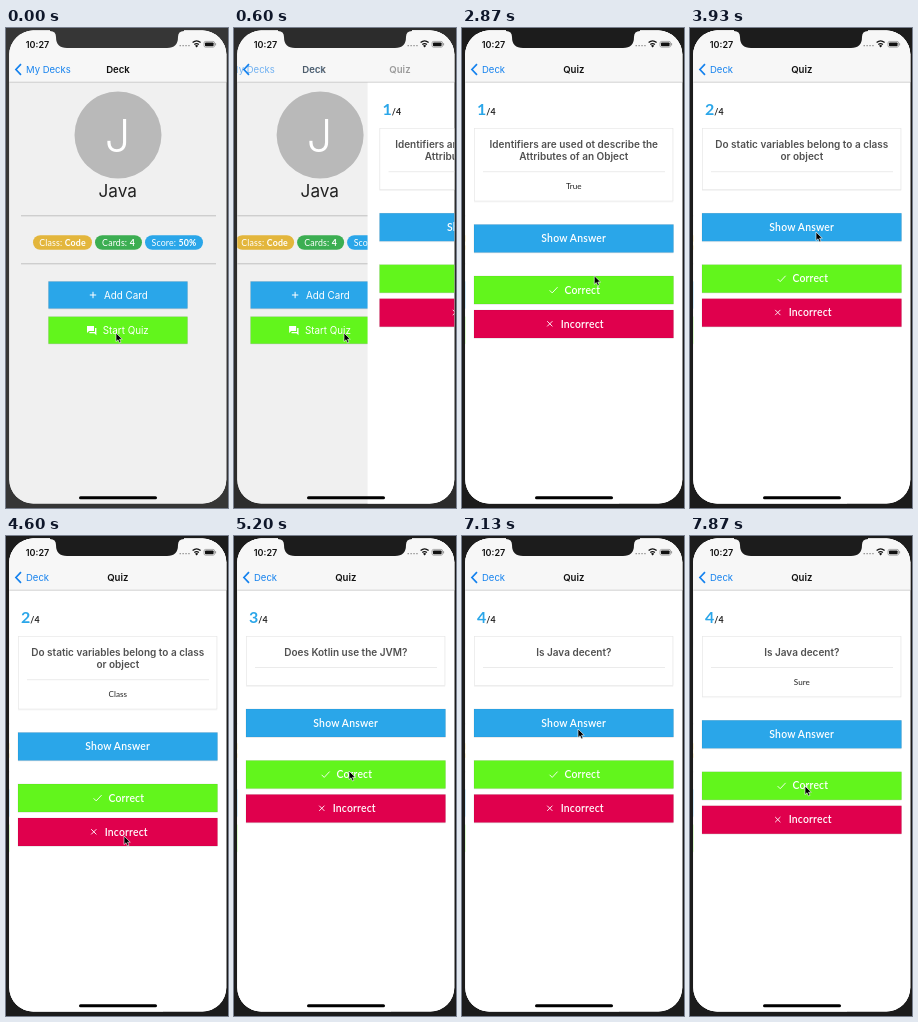
Write an HTML page that moves like this. It is 222 px wide and 480 px high and loops after 8000 ms.

```html
<!DOCTYPE html>
<html lang="en">
<head>
<meta charset="utf-8">
<title>Quiz app</title>
<style>
  html, body { margin: 0; width: 100%; height: 100%; overflow: hidden; background: #1c1c1c; }
  svg { display: block; width: 100vw; height: 100vh; }
  text { font-family: Inter, sans-serif; }
  .av { font-family: Lato, sans-serif; }
  .mid { text-anchor: middle; }
  .semi { font-weight: 600; }
  .bold { font-weight: 700; }
  .line { fill: none; stroke: #fff; }
  .keys rect { stroke: #000; stroke-opacity: .1; stroke-width: .6; }
</style>
</head>
<body>
<svg viewBox="0 0 222 480">
  <defs>
    <clipPath id="glass"><rect x="3.3" y="2.6" width="217" height="473" rx="24"/></clipPath>
    <filter id="soft" x="-5%" y="-10%" width="110%" height="125%">
      <feDropShadow dx="0" dy=".4" stdDeviation=".7" flood-opacity=".12"/>
    </filter>
  </defs>
  <rect id="bezel" width="222" height="480"/>
  <g clip-path="url(#glass)">
    <rect width="222" height="480" fill="#fff"/>

    <g id="deck">
      <rect width="222" height="480" fill="#f0f0f0"/>
      <circle cx="112" cy="107" r="43.5" fill="#b9b9b9"/>
      <text class="mid" x="111.5" y="123.5" font-size="45" font-weight="300" fill="#fff">J</text>
      <text class="mid" x="111.7" y="169" font-size="17.2" fill="#222">Java</text>
      <path d="M15 187.8H210M15 235.8H210" stroke="#b4b4b4" stroke-width=".8"/>
      <g id="pills"></g>
      <g class="keys" filter="url(#soft)">
        <rect x="42.5" y="253.5" width="139" height="27" fill="#2aa6e9"/>
        <rect x="42.5" y="288.7" width="139" height="27" fill="#62f51e"/>
      </g>
      <path class="line" d="M83.8 267H90.2M87 263.8V270.2"/>
      <path d="M81 298h7v5h-5l-2 2zM89 300h1.4v7.2l-2-2h-5v-1.2h5.6z" fill="#fff"/>
      <text x="98" y="270.5" font-size="9.8" fill="#fff">Add Card</text>
      <text x="96.8" y="305.7" font-size="9.8" fill="#fff">Start Quiz</text>
    </g>

    <g id="quiz">
      <rect width="222" height="480" fill="#fff"/>
      <text class="av bold" x="15" y="87"><tspan id="num" font-size="16" fill="#2aa6e9"></tspan><tspan font-size="8.8" fill="#222">/4</tspan></text>
      <rect id="card" x="12.3" y="100.3" width="198.6" fill="#fff" stroke="#e6e6e6" stroke-width=".6" filter="url(#soft)"/>
      <text id="q1" class="mid semi" x="111.8" y="119.6" font-size="10" fill="#505050"></text>
      <text id="q2" class="mid semi" x="111.8" y="132.2" font-size="10" fill="#505050"></text>
      <path id="rule" d="M21 131.5H203" stroke="#e2e2e2" stroke-width=".7"/>
      <text id="answer" class="av mid" x="111.8" y="149" font-size="8.1" fill="#222"></text>
      <g id="buttons">
        <g class="keys" filter="url(#soft)">
          <rect x="12" y="173" width="199.5" height="28" fill="#2aa6e9"/>
          <rect x="12" y="224.5" width="199.5" height="28" fill="#62f51e"/>
          <rect x="12" y="258.5" width="199.5" height="28" fill="#e0004d"/>
        </g>
        <g class="semi" fill="#fff" font-size="10.4" letter-spacing=".2">
          <text class="av mid" x="111.7" y="190.5">Show Answer</text>
          <text class="av" x="102.4" y="242.2">Correct</text>
          <text class="av" x="98.7" y="276.2">Incorrect</text>
        </g>
        <path class="line" d="M87.6 238.8l2.6 2.6 5.4-5.8M85.2 269.7l5.2 5.2M90.4 269.7l-5.2 5.2" stroke-width=".9"/>
      </g>
    </g>

    <rect width="222" height="54" fill="#f7f7f7"/>
    <path d="M0 54.2H222" stroke="#b2b2b2" stroke-width=".6"/>
    <path d="M15 36.2L9.9 41.5L15 46.8" fill="none" stroke="#1582ee" stroke-width="1.7"/>
    <text id="backOld" x="20" y="45" font-size="9.5" fill="#1582ee">My Decks</text>
    <text id="backNew" x="20" y="45" font-size="9.5" fill="#1582ee">Deck</text>
    <text id="titleOld" class="mid semi" x="112" y="45" font-size="9.6" fill="#111">Deck</text>
    <text id="titleNew" class="mid semi" x="111.8" y="45" font-size="9.6" fill="#111">Quiz</text>

    <text class="mid semi" x="31.5" y="19.8" font-size="9" fill="#111">10:27</text>
    <path d="M173.5 17.6H184" stroke="#999" stroke-width="1.3" stroke-dasharray="1.5 1.4"/>
    <path d="M186.6 14.6q4-3.4 8 0M188.3 16.5q2.3-1.9 4.6 0" fill="none" stroke="#111" stroke-width="1.3"/>
    <path d="M189 17.7q1.6-1.2 3.2 0l-1.6 1.7z" fill="#111"/>
    <rect x="198" y="13.4" width="10.6" height="5.8" rx="1.6" fill="none" stroke="#777" stroke-width=".6"/>
    <rect x="199" y="14.4" width="8.6" height="3.8" rx=".8" fill="#111"/>
    <path d="M209.6 15.2v2.2" stroke="#777" stroke-width=".8"/>
    <rect x="73" y="468.2" width="78" height="3" rx="1.5" fill="#000"/>
  </g>
  <path id="notch" d="M44 0H178V3q-6 0-6 6q0 11-11 11H61q-11 0-11-11q0-6-6-6z"/>
  <path id="cursor" d="M0 0V8.6L2 6.8L3.5 10L5 9.3L3.6 6.2H6.3z" fill="#000" stroke="#fff" stroke-width=".6"/>
</svg>
<script>
const LOOP = 8000;
const $ = id => document.getElementById(id);
const set = (id, attrs) => { for (const k in attrs) $(id).setAttribute(k, attrs[k]); };
const clamp = v => Math.max(0, Math.min(1, v));
const ease = v => v * v * (3 - 2 * v);
const mix = (a, b, p) => a + (b - a) * p;

const PUSH = { start: 520, end: 1040 };
const cards = [
  { at: 0, reveal: 2080, lines: ["Identifiers are used ot describe the", "Attributes of an Object"], answer: "True" },
  { at: 3260, reveal: 4140, lines: ["Do static variables belong to a class", "or object"], answer: "Class" },
  { at: 4830, reveal: 5800, lines: ["Does Kotlin use the JVM?", ""], answer: "Yes" },
  { at: 6600, reveal: 7340, lines: ["Is Java decent?", ""], answer: "Sure" }
];

// Pointer stops: time, x, y
const stops = [
  [0, 110, 305], [900, 110, 305], [1300, 93, 204], [2200, 93, 204],
  [2800, 134, 242], [3000, 128, 262], [3340, 128, 262], [3800, 126, 204],
  [4220, 126, 204], [4540, 118, 300], [4850, 118, 300], [5140, 115, 235],
  [5350, 115, 235], [5600, 116, 192], [5860, 116, 192], [6200, 115.5, 252],
  [6680, 115.5, 252], [7020, 116, 193], [7400, 116, 193], [7700, 115, 250], [LOOP, 115, 250]
];

const pills = [
  [27, 59, "#e3b63c", "Class: ", "Code"],
  [89, 47, "#3cae52", "Cards: ", "4"],
  [139, 58, "#2aa6e9", "Score: ", "50%"]
];
$("pills").innerHTML = pills.map(([x, w, fill, label, value]) =>
  `<rect x="${x}" y="207.2" width="${w}" height="14.6" rx="7.3" fill="${fill}"/>
   <text class="av mid" x="${x + w / 2}" y="217.6" font-size="8.8" letter-spacing=".15" fill="#fff">${label}<tspan class="bold">${value}</tspan></text>`
).join("");

function pointer(t) {
  const i = stops.findIndex(s => s[0] > t);
  const [t0, x0, y0] = stops[i - 1], [t1, x1, y1] = stops[i];
  const p = ease((t - t0) / (t1 - t0));
  return [mix(x0, x1, p), mix(y0, y1, p)];
}

function drawPush(t) {
  const p = 1 - (1 - clamp((t - PUSH.start) / (PUSH.end - PUSH.start))) ** 3;
  const shade = Math.round(mix(54, 28, p));
  const dark = `rgb(${shade},${shade},${shade})`;
  set("bezel", { fill: dark });
  set("notch", { fill: dark });
  set("deck", { transform: `translate(${-65 * p})` });
  set("quiz", { transform: `translate(${222 * (1 - p)})` });
  set("backOld", { opacity: 1 - p, x: 20 - 60 * p });
  set("titleOld", { opacity: 1 - p, x: 112 - 80 * p });
  set("backNew", { opacity: p, x: 100 - 80 * p });
  set("titleNew", { opacity: p, x: 111.8 + 90 * (1 - p) });
}

function drawCard(t) {
  let n = cards.length - 1;
  while (cards[n].at > t) n--;
  const { lines, answer, reveal } = cards[n];
  const shown = t >= reveal;
  const wrap = lines[1] ? 12.2 : 0;
  const grow = wrap + (shown ? 11.3 : 0);
  $("num").textContent = n + 1;
  $("q1").textContent = lines[0];
  $("q2").textContent = lines[1];
  $("answer").textContent = shown ? answer : "";
  set("rule", { transform: `translate(0 ${wrap})` });
  set("answer", { y: 149 + wrap });
  set("card", { height: 49.2 + grow });
  set("buttons", { transform: `translate(0 ${grow})` });
}

function draw(t) {
  drawPush(t);
  drawCard(t);
  set("cursor", { transform: `translate(${pointer(t)})` });
}

const begin = performance.now();
function tick() {
  draw((performance.now() - begin) % LOOP);
  requestAnimationFrame(tick);
}
tick();
</script>
</body>
</html>
```
